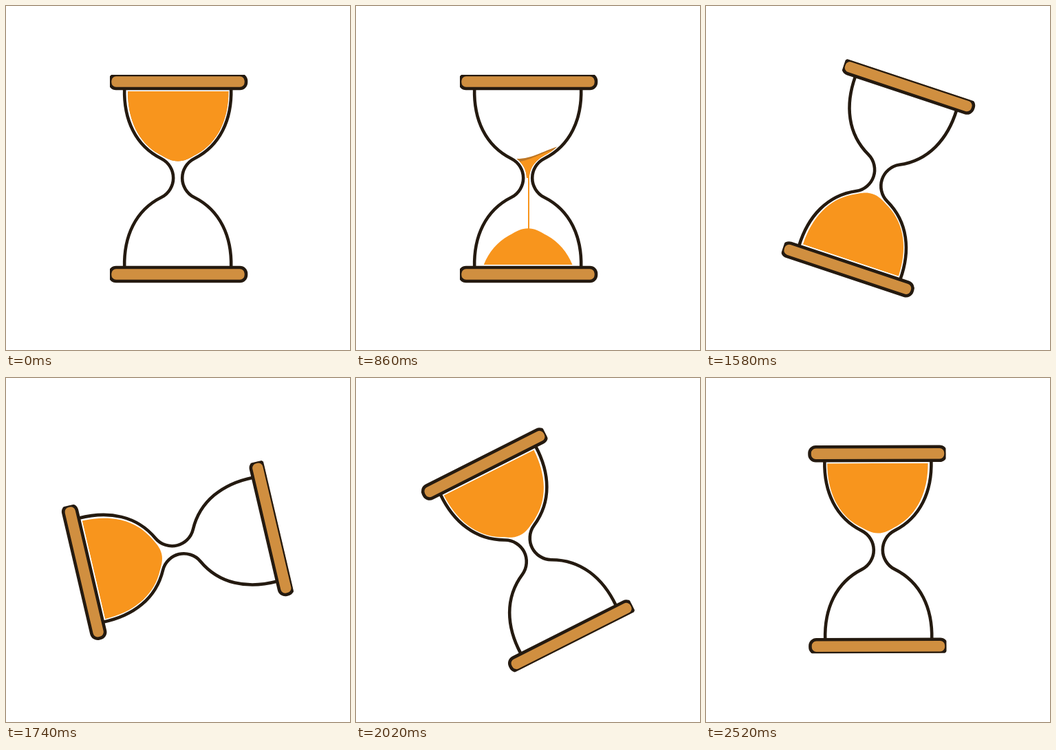
Write an HTML page that moves like this. It is 500 px wide and 500 px high and loops after 2.54 s.

```html
<!DOCTYPE html>
<html lang="en">
<head>
<meta charset="utf-8">
<title>Hourglass</title>
<style>
  html, body { margin: 0; height: 100%; overflow: hidden; background: #fff; }
  svg { display: block; width: 100%; height: 100%; }
  .line { stroke: #241a10; stroke-width: 4.6; fill: none; }
  .bar { fill: #d08f40; }
  .sand { fill: #f8951d; }
  .shade { fill: #bd7726; }
</style>
</head>
<body>
<svg viewBox="0 0 500 500">
  <defs>
    <clipPath id="frame"><rect x="151" y="100" width="260" height="310"/></clipPath>
    <clipPath id="upper"><path id="bulb"/></clipPath>
    <clipPath id="floor"><rect x="150" y="250" width="200" height="126"/></clipPath>
    <path id="side" d="M172.2 120C171 165 188 203 226 222C237 227.500 243.200 239 243.200 250S237 272.500 226 278C188 297 171 335 172.200 380"/>
  </defs>
  <g id="hourglass">
    <g clip-path="url(#frame)">
      <g clip-path="url(#upper)">
        <path id="back" class="shade"/>
        <path id="front" class="sand"/>
      </g>
      <rect id="stream" class="sand" x="250" width="2"/>
      <g clip-path="url(#floor)"><path id="mound" class="sand"/></g>
      <use href="#side" class="line"/>
      <use href="#side" class="line" transform="translate(499.4) scale(-1 1)"/>
      <rect class="line bar" x="151" y="100" width="198" height="20" rx="9"/>
      <rect class="line bar" x="151" y="380" width="198" height="20" rx="9"/>
    </g>
  </g>
</svg>
<script>
const LOOP = 2540, STEP = 20;
const $ = id => document.getElementById(id);
const clamp = v => Math.max(0, Math.min(1, v));

// Sand body of one bulb; k = 0 has a round tip, k = 1 reaches into the neck.
function bulbPath(k) {
  const tip = 225.5 + 24.5 * k;
  const y1 = 221.5 + 1.5 * k, y2 = 225.5 + 8.5 * k;
  const a = 16 - 4 * k, b = 10 - 8 * k, c = 2 * k;
  return `M177 124H323.4C323.4 165 308 198 278 215
    C${250 + a} ${y1} ${250 + b} ${y2} ${250 + c} ${tip}H${250 - c}
    C${250 - b} ${y2} ${250 - a} ${y1} 222 215C192 198 177 165 177 124Z`;
}

function wavePath(level, amp, crest) {
  let d = 'M170 260';
  for (let x = 170; x <= 330; x += 4)
    d += `L${x} ${level - amp * Math.cos((x - crest) * Math.PI / 75)}`;
  return d + 'V260Z';
}

// Cubic easing with handles (x1, 0) and (x2, 1).
function ease(t, x1, x2) {
  let lo = 0, hi = 1;
  for (let i = 0; i < 30; i++) {
    const s = (lo + hi) / 2, r = 1 - s;
    if (3 * x1 * s * r * r + 3 * x2 * s * s * r + s ** 3 < t) lo = s;
    else hi = s;
  }
  return lo * lo * (3 - 2 * lo);
}

function draw(t) {
  // Upper sand sinks with a wavy surface.
  const level = 110 + 155 * (t / 1060) ** 2;
  const amp = 10 * clamp(t / 300);
  const slide = (t - 560) * 0.06;
  $('bulb').setAttribute('d', bulbPath(clamp(t / 120)));
  $('back').setAttribute('d', wavePath(level, amp, 292 + slide));
  $('front').setAttribute('d', wavePath(level + 5, amp, 171 - slide));

  // Thin stream: the head falls first, the tail follows.
  const head = 250 + 126 * clamp((t - 120) / 360) ** 2;
  const tail = 250 + Math.max(0, t - 1060) * 0.7;
  $('stream').setAttribute('y', tail);
  $('stream').setAttribute('height', Math.max(0, head - tail));

  // Lower sand rises out of the floor.
  const sunk = 102 * (1 - clamp((t - 490) / 710));
  $('mound').setAttribute('transform', `translate(0 ${500 + sunk}) scale(1 -1)`);

  const turn = t > 1330 ? 180 * ease((t - 1330) / 1250, 0.47, 0.133) : 0;
  $('hourglass').setAttribute('transform', `rotate(${turn} 250 250)`);
}

$('mound').setAttribute('d', bulbPath(0));
const start = performance.now();
function tick() {
  const t = (performance.now() - start) % LOOP;
  draw(Math.floor(t / STEP) * STEP);
  requestAnimationFrame(tick);
}
tick();
</script>
</body>
</html>
```
